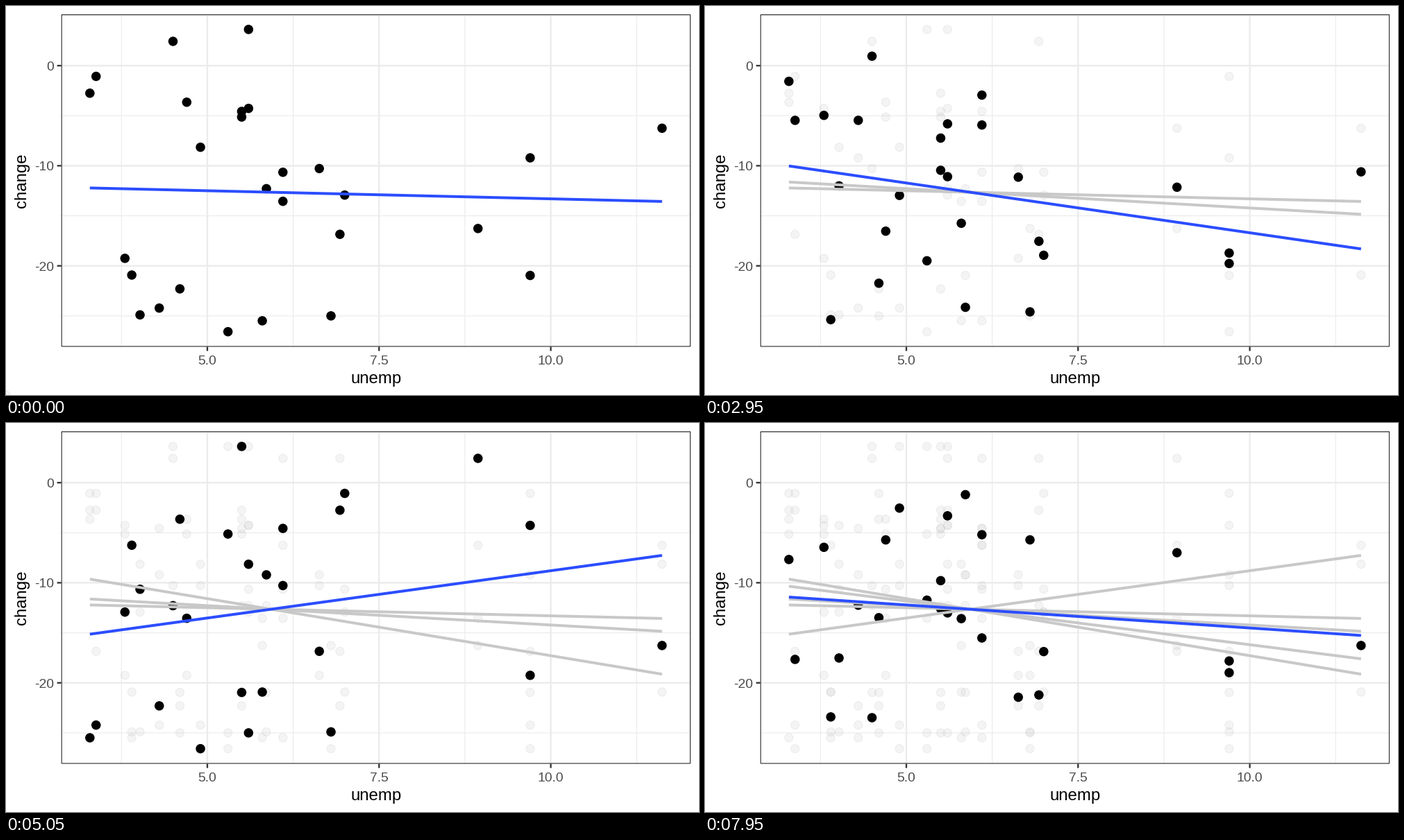
Recreate the animation shown at these times as a matplotlib script. Size 998 by 561 pixels, loop 8 s.

```python
import matplotlib.pyplot as plt
import numpy as np
from matplotlib.animation import FuncAnimation

W, H, DPI = 998, 561, 64
PT = 72 / DPI                      # points per pixel
LEFT, RIGHT, TOP, BOTTOM = 79.6, 986, 12, 491.5
FRAMES, INTERVAL = 160, 50
PERIOD, MOVE, START = 34, 22, 11   # in frames

plt.rcParams["font.family"] = "Liberation Sans"
plt.rcParams["path.snap"] = False

unemp = np.array([
    3.29, 3.38, 3.8, 3.9, 4.02, 4.3, 4.5, 4.6, 4.7, 4.9, 5.3, 5.5, 5.5, 5.6,
    5.6, 5.8, 5.86, 6.1, 6.1, 6.63, 6.8, 6.93, 7.0, 8.94, 9.7, 9.7, 11.62])
change = np.array([
    -2.75, -1.07, -19.25, -20.92, -24.9, -24.22, 2.43, -22.3, -3.65, -8.15,
    -26.58, -4.57, -5.13, 3.62, -4.27, -25.49, -12.29, -10.65, -13.55, -10.28,
    -25.0, -16.85, -12.93, -16.27, -9.21, -20.96, -6.25])
# Each shuffle deals the change values out to the unemp values anew.
shuffles = [
    [8, 21, 14, 4, 9, 24, 19, 20, 12, 5, 13, 0, 7, 16, 22, 18, 25, 11, 15, 2,
     23, 6, 17, 26, 1, 10, 3],
    [1, 0, 12, 15, 22, 11, 13, 25, 2, 19, 20, 16, 8, 14, 17, 23, 4, 26, 6, 24,
     10, 7, 3, 18, 5, 21, 9],
    [15, 5, 22, 26, 17, 7, 16, 8, 18, 10, 12, 13, 25, 9, 20, 3, 24, 11, 19,
     21, 4, 0, 1, 6, 2, 14, 23],
    [12, 10, 8, 3, 14, 15, 25, 1, 17, 13, 18, 20, 11, 0, 6, 9, 24, 5, 26, 7,
     2, 16, 22, 21, 19, 4, 23],
    [24, 16, 9, 4, 15, 14, 20, 25, 0, 26, 17, 12, 22, 8, 7, 21, 13, 19, 11, 3,
     6, 10, 2, 1, 5, 18, 23],
]
states = [change] + [change[order] for order in shuffles]


def padded(values):
    pad = 0.05 * np.ptp(values)
    return values.min() - pad, values.max() + pad


X0, X1 = padded(unemp)
Y0, Y1 = padded(change)


def px(x):
    return LEFT + (x - X0) / (X1 - X0) * (RIGHT - LEFT)


def py(y):
    return TOP + (Y1 - y) / (Y1 - Y0) * (BOTTOM - TOP)


fig = plt.figure(figsize=(W / DPI, H / DPI), dpi=DPI, facecolor="white")
ax = fig.add_axes([0, 0, 1, 1])
ax.set_xlim(0, W)
ax.set_ylim(H, 0)
ax.axis("off")


def stroke(xs, ys, width, color, z):
    return ax.plot(xs, ys, color=color, lw=width * PT, zorder=z,
                   solid_capstyle="butt", solid_joinstyle="miter")[0]


def label(x, y, text, size, color, **kw):
    ax.text(x, y, text, fontsize=size * PT, color=color, va="baseline",
            rotation_mode="anchor", **kw)


def dots(color, alpha, z):
    sizes = np.full(len(unemp), (2 * 6.04 * PT) ** 2)
    return ax.scatter(px(unemp), py(change), s=sizes, facecolor=color,
                      edgecolor=color, lw=1.42 * PT, alpha=alpha, zorder=z)


def grid(xs, ys, width):
    for x in xs:
        stroke([px(x)] * 2, [TOP, BOTTOM], width, "#EBEBEB", 1)
    for y in ys:
        stroke([LEFT, RIGHT], [py(y)] * 2, width, "#EBEBEB", 1)


def fit(y):
    slope, base = np.polyfit(unemp, y, 1)
    ends = unemp[[0, -1]]
    return px(ends), py(base + slope * ends)


# Panel, axes and titles
grid([3.75, 6.25, 8.75, 11.25], [5, -5, -15, -25], 1.17)
grid([5, 7.5, 10], [0, -10, -20], 2.33)
for x in (5, 7.5, 10):
    stroke([px(x)] * 2, [BOTTOM, BOTTOM + 6], 2.33, "#333333", 1)
    label(px(x), 517, f"{x:.1f}", 19.2, "#4D4D4D", ha="center")
for y in (0, -10, -20):
    stroke([LEFT - 6, LEFT], [py(y)] * 2, 2.33, "#333333", 1)
    label(LEFT - 10.8, py(y) + 6.8, str(y), 19.2, "#4D4D4D", ha="right")
label((LEFT + RIGHT) / 2, 544.3, "unemp", 24, "black", ha="center")
label(29.3, (TOP + BOTTOM) / 2, "change", 24, "black", ha="center", rotation=90)
l, r, t, b = LEFT + 0.58, RIGHT - 0.58, TOP + 0.58, BOTTOM - 0.58
stroke([l, r, r, l, l], [t, t, b, b, t], 1.17, "#333333", 8)

# Moving parts
past_dots = dots("#C8C8C8", 0.2, 2)
live_dots = dots("black", 1, 3)
past_lines = [stroke(*fit(y), 4, "#C8C8C8", 4) for y in states[:-1]]
live_line = stroke(*fit(change), 4, "#3366FF", 5)
live_line.set_color("#2B4DFF")


def ease(t):
    return 4 * t ** 3 if t < 0.5 else 1 - 4 * (1 - t) ** 3


def points(y):
    return np.column_stack([px(unemp), py(y)])


def draw(frame):
    step, pos = divmod(frame - START, PERIOD)
    k = ease(min(pos / MOVE, 1))
    y = (1 - k) * states[step] + k * states[step + 1]
    live_dots.set_offsets(points(y))
    live_line.set_data(*fit(y))

    seen = step + 1 if pos > 0 else step
    trail = [points(s) for s in states[:seen]]
    past_dots.set_offsets(np.vstack(trail) if trail else np.empty((0, 2)))
    for i, line in enumerate(past_lines):
        line.set_visible(i < seen)
    return [past_dots, live_dots, live_line, *past_lines]


anim = FuncAnimation(fig, draw, frames=FRAMES, interval=INTERVAL,
                     init_func=lambda: draw(0), repeat=True, repeat_delay=0)
plt.show()
```
